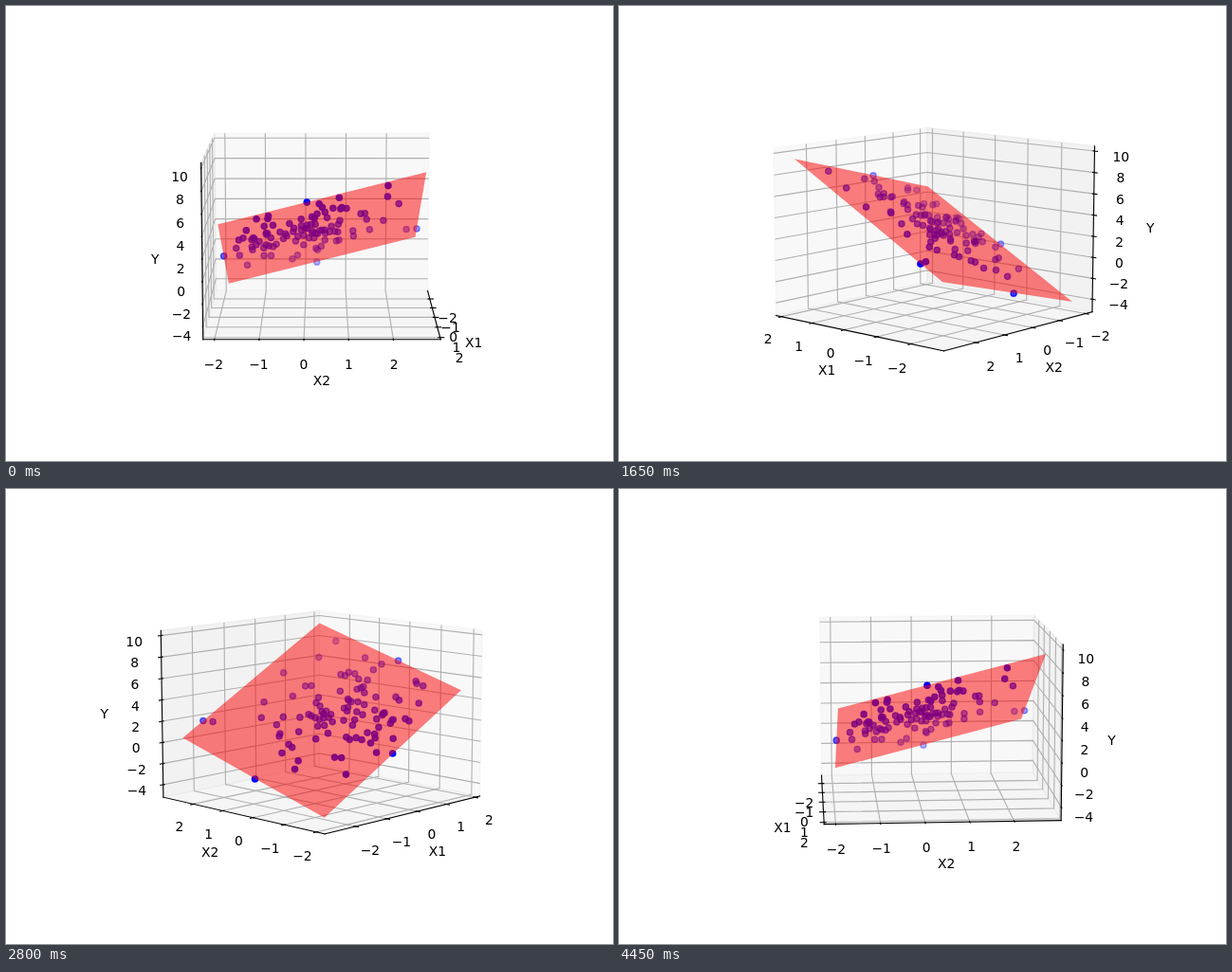
Write an HTML page that moves like this. It is 640 px wide and 480 px high and loops after 4.5 s.

```html
<!DOCTYPE html>
<html lang="en">
<head>
<meta charset="utf-8">
<title>Regression plane</title>
<style>
  html, body { margin: 0; width: 100%; height: 100%; overflow: hidden; background: #fff; }
  svg { display: block; width: 640px; height: 480px; }
  text { font: 13.889px "DejaVu Sans", sans-serif; text-anchor: middle; fill: #000; }
  .grid { fill: none; stroke: #b0b0b0; stroke-width: 1.111; }
  .axis { fill: none; stroke: #000; stroke-width: 1.111; stroke-linecap: square; }
  .pane { fill-opacity: .5; stroke-opacity: .5; stroke-width: 1.389; }
  .dot { fill: #00f; stroke: #00f; stroke-width: 1.389; }
  .plane { fill: #fb0000; fill-opacity: .5; }
</style>
</head>
<body>
<svg id="stage" viewBox="0 0 640 480"></svg>
<script>
const STEPS = 90, STEP_MS = 50, COUNT = 100;
const ELEV = 10 * Math.PI / 180, DIST = 10;
const SCALE = 369.6 / 0.185, CX = 333, CY = 237.4;
const ASPECT = [8 / 7, 8 / 7, 6 / 7];
const HALF = 25 / 48, DELTA = 1 / 12;
const PER_POINT = 48 / 532.224;
const TICK_PAD = 11.5 * PER_POINT * DELTA, LABEL_PAD = 25 * PER_POINT * DELTA;
const PANE_COLORS = ['#f2f2f2', '#e6e6e6', '#ececec'];

// Mersenne twister feeding polar normal deviates
function normalSource(seed) {
  const mt = [seed >>> 0];
  for (let i = 1; i < 624; i++) {
    const s = mt[i - 1] ^ (mt[i - 1] >>> 30);
    mt[i] = (Math.imul(1812433253, s) + i) >>> 0;
  }
  let at = 624, spare = null;
  function twist() {
    for (let i = 0; i < 624; i++) {
      const y = (mt[i] & 0x80000000) | (mt[(i + 1) % 624] & 0x7fffffff);
      mt[i] = (mt[(i + 397) % 624] ^ (y >>> 1) ^ (y & 1 ? 0x9908b0df : 0)) >>> 0;
    }
    at = 0;
  }
  function word() {
    if (at === 624) twist();
    let y = mt[at++];
    y ^= y >>> 11;
    y ^= (y << 7) & 0x9d2c5680;
    y ^= (y << 15) & 0xefc60000;
    return (y ^ (y >>> 18)) >>> 0;
  }
  function uniform() {
    const a = word() >>> 5, b = word() >>> 6;
    return (a * 67108864 + b) / 9007199254740992;
  }
  return () => {
    if (spare !== null) {
      const kept = spare;
      spare = null;
      return kept;
    }
    let u, v, r;
    do {
      u = 2 * uniform() - 1;
      v = 2 * uniform() - 1;
      r = u * u + v * v;
    } while (r >= 1 || r === 0);
    const f = Math.sqrt(-2 * Math.log(r) / r);
    spare = f * u;
    return f * v;
  };
}

const normal = normalSource(42);
const draw = () => Array.from({ length: COUNT }, normal);
const x1 = draw(), x2 = draw();
const y = draw().map((e, i) => 3 + 2 * x1[i] + x2[i] + 0.1 * e);

// Least squares plane y = b0 + b1 x1 + b2 x2
const mean = a => a.reduce((s, v) => s + v, 0) / a.length;
const cov = (a, b) => {
  const ma = mean(a), mb = mean(b);
  return mean(a.map((v, i) => (v - ma) * (b[i] - mb)));
};
const s11 = cov(x1, x1), s22 = cov(x2, x2), s12 = cov(x1, x2);
const s1y = cov(x1, y), s2y = cov(x2, y), det = s11 * s22 - s12 * s12;
const b1 = (s1y * s22 - s2y * s12) / det;
const b2 = (s2y * s11 - s1y * s12) / det;
const b0 = mean(y) - b1 * mean(x1) - b2 * mean(x2);
const fit = (a, b) => b0 + b1 * a + b2 * b;

const range = a => [Math.min(...a), Math.max(...a)];
const r1 = range(x1), r2 = range(x2);
const limits = [r1, r2, [fit(r1[0], r2[0]), fit(r1[1], r2[1])]];
const unit = (v, i) => {
  const [lo, hi] = limits[i];
  return (v - (lo + hi) / 2) / (1.1 * (hi - lo));
};
const points = x1.map((v, i) => [v, x2[i], y[i]].map(unit));
const corners = [[0, 0], [1, 0], [1, 1], [0, 1]].map(([i, j]) =>
  [r1[i], r2[j], fit(r1[i], r2[j])].map(unit));

const axes = [
  { name: 'X1', ticks: [-2, -1, 0, 1, 2], side: 1, tickDir: 1 },
  { name: 'X2', ticks: [-2, -1, 0, 1, 2], side: 0, tickDir: 0 },
  { name: 'Y', ticks: [-4, -2, 0, 2, 4, 6, 8, 10], side: 0, tickDir: 0 }
];

function camera(azim) {
  const ca = Math.cos(azim), sa = Math.sin(azim);
  const ce = Math.cos(ELEV), se = Math.sin(ELEV);
  return p => {
    const [a, b, c] = p.map((v, i) => v * ASPECT[i]);
    const ahead = a * ca + b * sa;
    const depth = DIST - ahead * ce - c * se;
    return {
      x: CX + SCALE * (b * ca - a * sa) / depth,
      y: CY - SCALE * (c * ce - ahead * se) / depth,
      depth
    };
  };
}

const withValue = (p, i, v) => p.map((old, k) => k === i ? v : old);
const pushOut = (p, skip, d) => p.map((v, k) => k === skip ? v : v + (v < 0 ? -d : d));
const num = v => v.toFixed(2);
const minus = v => String(v).replace('-', '\u2212');

function render(step) {
  const azim = step * 4 * Math.PI / 180;
  const project = camera(azim);
  const path = pts => pts.map(project).map(q => num(q.x) + ',' + num(q.y)).join(' ');
  const line = (cls, pts) => `<polyline class="${cls}" points="${path(pts)}"/>`;
  const text = (p, drop, str) => {
    const q = project(p);
    return `<text x="${num(q.x)}" y="${Math.round(q.y + drop)}">${str}</text>`;
  };

  // Walls stand on the sides away from the viewer
  const eye = [Math.cos(azim), Math.sin(azim), 1];
  const back = eye.map(v => v < -1e-9 ? HALF : -HALF);
  const front = back.map(v => -v);
  let panes = '', grid = '', lines = '', labels = '';

  axes.forEach((axis, i) => {
    const j = (i + 1) % 3, k = (i + 2) % 3;
    const nextJ = withValue(back, j, front[j]), nextK = withValue(back, k, front[k]);
    const quad = [back, nextJ, withValue(nextJ, k, front[k]), nextK];
    panes += `<polygon class="pane" fill="${PANE_COLORS[i]}" stroke="${PANE_COLORS[i]}" points="${path(quad)}"/>`;

    const edge = withValue(back, axis.side, front[axis.side]);
    lines += line('axis', [edge, withValue(edge, i, front[i])]);
    labels += text(pushOut(withValue(edge, i, 0), i, LABEL_PAD), 4, axis.name);

    for (const tick of axis.ticks) {
      const u = unit(tick, i), d = axis.tickDir;
      grid += line('grid', [nextJ, back, nextK].map(p => withValue(p, i, u)));
      const at = withValue(edge, i, u), out = Math.sign(edge[d]) * DELTA;
      lines += line('axis', [
        withValue(at, d, at[d] - 0.1 * out),
        withValue(at, d, at[d] + 0.2 * out)
      ]);
      labels += text(pushOut(at, i, TICK_PAD), 11, minus(tick));
    }
  });

  // Far dots fade and are drawn first
  const dots = points.map(project).sort((a, b) => b.depth - a.depth);
  const far = -DIST / dots[0].depth, near = -DIST / dots[COUNT - 1].depth;
  const cloud = dots.map(q => {
    const alpha = (1 - 0.7 * (-DIST / q.depth - near) / (far - near)).toFixed(3);
    return `<circle class="dot" cx="${num(q.x)}" cy="${num(q.y)}" r="3.106" fill-opacity="${alpha}" stroke-opacity="${alpha}"/>`;
  }).join('');

  stage.innerHTML = panes + grid + lines + labels + cloud +
    `<polygon class="plane" points="${path(corners)}"/>`;
}

const stage = document.getElementById('stage');
let shown = -1;
function tick() {
  const step = Math.floor(performance.now() / STEP_MS) % STEPS;
  if (step !== shown) render(shown = step);
  requestAnimationFrame(tick);
}
tick();
</script>
</body>
</html>
```
